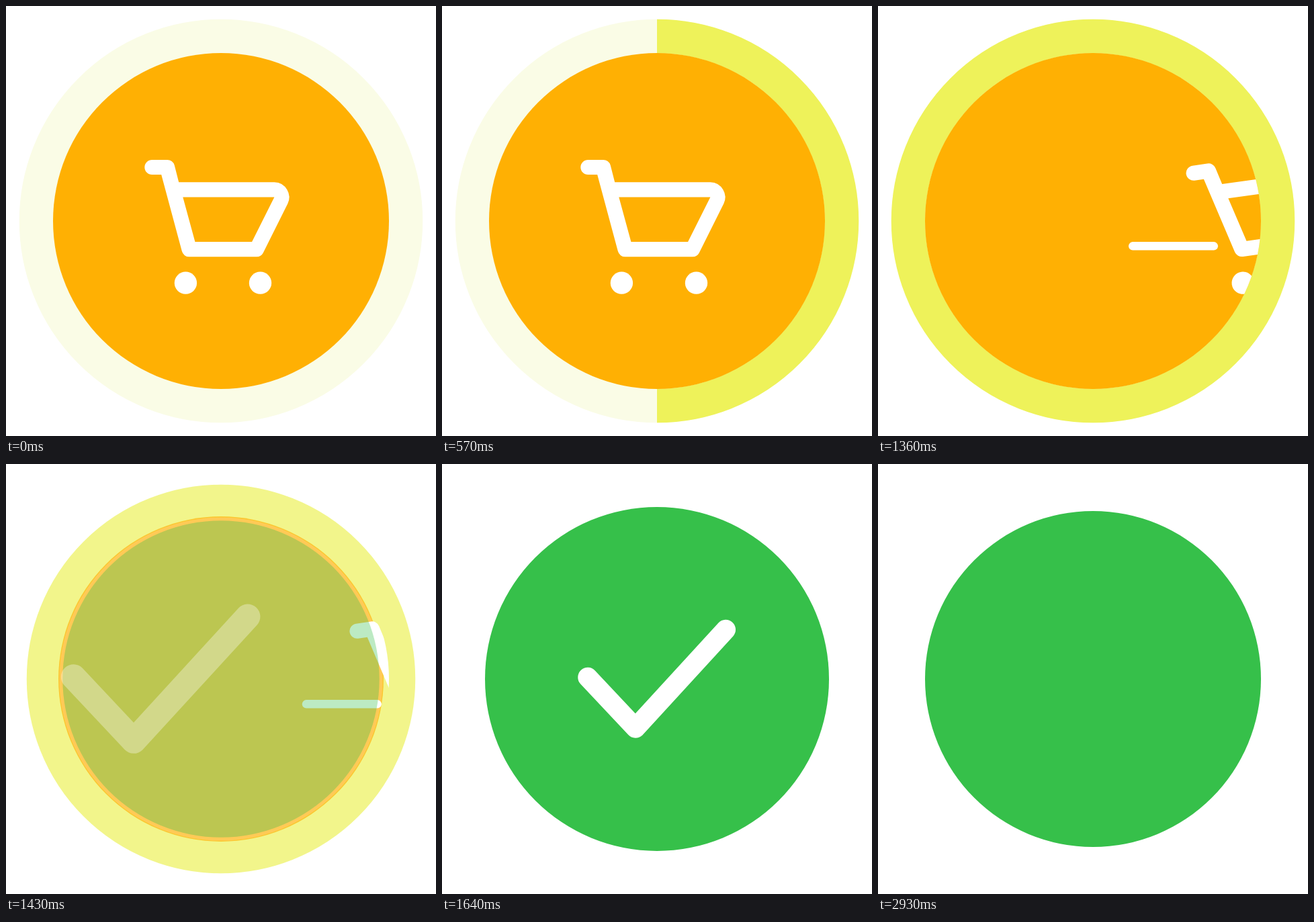
Recreate the animation shown at these times as an HTML page with a canvas. Size 640 px wide and 640 px high, loop 3000 ms.

```html
<!DOCTYPE html>
<html lang="en">
<head>
<meta charset="utf-8">
<title>Cart to check</title>
<style>
html, body { margin: 0; width: 100%; height: 100%; overflow: hidden; background: #fff; }
canvas { display: block; width: 640px; height: 640px; }
</style>
</head>
<body>
<canvas id="stage" width="640" height="640"></canvas>
<script>
const ctx = document.getElementById('stage').getContext('2d');
const FPS = 14, LOOP = 3000, CENTER = 320, UNIT = 11.11;
const PALE = '#fafce6', BRIGHT = '#eef25a', ORANGE = '#ffb003', GREEN = '#36c04a';

const basket = new Path2D('M21.08 7a2 2 0 0 0-1.7-1H6.58L6 3.74A1 1 0 0 0 5 3H3a1 1 0 0 0 0 2h1.24' +
  'L7 15.26A1 1 0 0 0 8 16h9a1 1 0 0 0 .89-.55l3.28-6.56A2 2 0 0 0 21.08 7z' +
  'm-4.7 7H8.76L7.13 8h12.25z');
const tick = new Path2D('M-103-2.5L-32 73L102.3-73.5');

const span = (k, a, b) => Math.min(1, Math.max(0, (k - a) / (b - a)));
const smooth = (k, a, b) => { const u = span(k, a, b); return u * u * (3 - 2 * u); };
const mix = (a, b, u) => a + (b - a) * u;
const travel = k => 429 * Math.sin(span(k, 15, 24) * Math.PI / 2);

function disc(r, color, x = CENTER, y = CENTER) {
  ctx.fillStyle = color;
  ctx.beginPath();
  ctx.arc(x, y, r, 0, 2 * Math.PI);
  ctx.fill();
}

function ring(scale, part, color) {
  if (!part) return;
  ctx.strokeStyle = color;
  ctx.lineWidth = 50.5 * scale;
  ctx.beginPath();
  ctx.arc(CENTER, CENTER, 275 * scale, -Math.PI / 2, (2 * part - 0.5) * Math.PI);
  ctx.stroke();
}

function cart(k) {
  ctx.save();
  ctx.beginPath();
  ctx.arc(CENTER, CENTER, 250, 0, 2 * Math.PI);
  ctx.clip();

  // speed line: its tail follows its head two steps later
  const head = 221 + travel(k), tail = 233 + travel(k - 2);
  if (head > tail && k < 21) {
    ctx.strokeStyle = '#fff';
    ctx.lineWidth = 12.5;
    ctx.lineCap = 'round';
    ctx.beginPath();
    ctx.moveTo(tail - 0.5, 357.3);
    ctx.lineTo(head + 3, 357.3);
    ctx.stroke();
  }

  // the cart tips back around its rear wheel
  ctx.translate(267.4 + travel(k), 412.2);
  ctx.rotate(-8 * smooth(k, 14, 17) * Math.PI / 180);
  ctx.scale(UNIT, UNIT);
  ctx.translate(-7.5, -19.5);
  ctx.fillStyle = '#fff';
  ctx.fill(basket);
  disc(1.5, '#fff', 7.5, 19.5);
  disc(1.5, '#fff', 17.5, 19.5);
  ctx.restore();
}

function check(k) {
  const u = smooth(k, 19, 23), scale = mix(1.312, 1, u);
  ctx.save();
  ctx.translate(CENTER + mix(-106, 0, u), CENTER);
  ctx.scale(scale, scale);
  ctx.strokeStyle = '#fff';
  ctx.lineWidth = 29.5;
  ctx.lineCap = ctx.lineJoin = 'round';
  ctx.stroke(tick);
  ctx.restore();
}

function draw(k) {
  const fade = span(k, 19, 22.05);
  ctx.globalAlpha = 1;
  ctx.clearRect(0, 0, 640, 640);

  if (fade < 1) {
    ctx.globalAlpha = 1 - fade;
    const ringScale = mix(1, 0.888, fade);
    ring(ringScale, 1, PALE);
    ring(ringScale, smooth(k, 1, 15), BRIGHT);
    disc(250 * mix(1, 0.902, fade), ORANGE);
    ctx.globalAlpha = 1;
    cart(k);
  }
  if (fade > 0) {
    ctx.globalAlpha = fade;
    const grow = mix(232, 256, smooth(k, 19, 23));
    disc(grow - 6 * smooth(k, 23, 27), GREEN);
    if (k < 41) check(k);
  }
}

// motion advances in even steps
function tickFrame() {
  const t = performance.now() % LOOP;
  draw(Math.floor((t + 5) * FPS / 1000) % (LOOP * FPS / 1000));
  requestAnimationFrame(tickFrame);
}
tickFrame();
</script>
</body>
</html>
```
